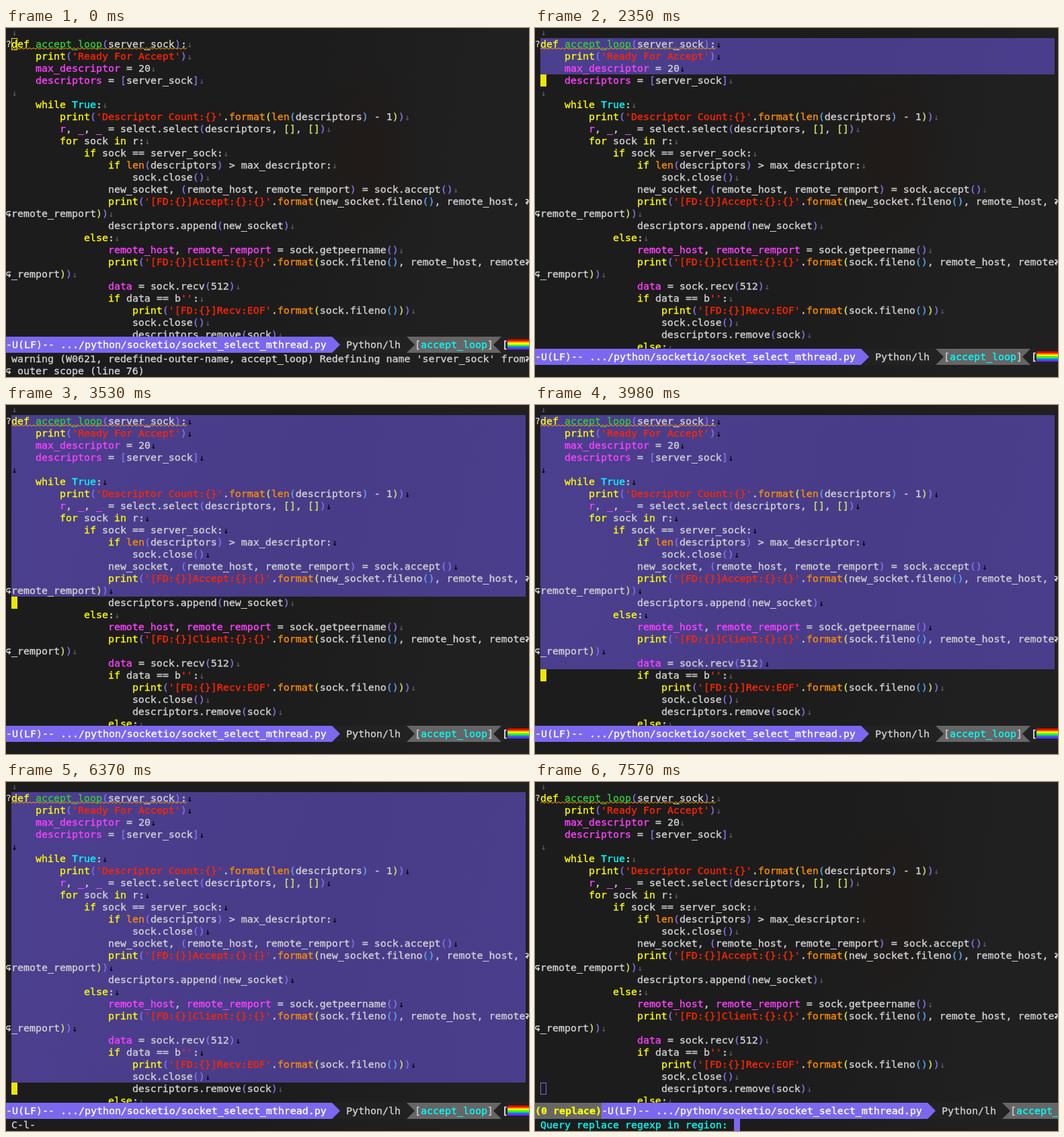
Write an HTML page that moves like this. It is 778 px wide and 519 px high and loops after 8000 ms.

```html
<!DOCTYPE html>
<html lang="en">
<head>
<meta charset="utf-8">
<title>Editor: select region and query replace</title>
<style>
html, body { margin: 0; width: 100%; height: 100%; overflow: hidden; background: #1c1c1c; }
#stage {
  position: relative; width: 778px; height: 519px; overflow: hidden; color: #d2d2d2;
  font: 14.95px/18px "DejaVu Sans Mono", monospace; white-space: pre;
  -webkit-text-stroke: .35px currentColor;
  background:
    radial-gradient(ellipse 90px 150px at 535px 190px, #24171280, transparent),
    linear-gradient(100deg, #1c1c1c 50%, #202020 85%);
}
#stage div, #stage svg { position: absolute; }
#view { left: 0; top: 0; width: 778px; overflow: hidden; }
.row { left: 8px; height: 18px; }
.eol { display: inline-block; width: 9px; font-size: 12px; text-align: center; color: #5a5a5a; }
.sel .eol { color: #050505; }
#region { left: 8px; top: 15px; width: 765px; background: linear-gradient(100deg, #4b3f8f, #483c88 60%, #4a3e8c); }
#cursor { left: 8px; width: 9px; height: 18px; box-sizing: border-box; border: 1px solid #eee600; }
#cursor.solid { background: #eee600; }
#cursor.idle { border-color: #7b68ee; }
.kw { color: #ffff00; } .str { color: #ff2600; } .fn { color: #32cd32; }
.var { color: #ff40ff; } .bi { color: #ff8c00; } .const { color: #00ffff; }
.d1 { color: #8a70ee; } .d2 { color: #cde869; } .d3 { color: #5ba4f0; }
.under-cursor { color: #1c1c1c; }
.mark { width: 8px; height: 18px; fill: none; stroke: #ddd; stroke-width: 1.3; }
#wave { left: 0; top: 0; width: 300px; height: 40px; fill: none; stroke: #ffa500; }
#bar { left: 0; width: 778px; height: 24px; line-height: 24px; background: #222; overflow: hidden; }
#count { left: 0; top: 0; width: 99px; height: 24px; background: #666; color: #ffff00; font-weight: bold; }
#segments { top: 0; width: 820px; height: 24px; }
#segments div { top: 0; height: 24px; }
#file { left: 0; width: 497px; background: #7b68ee; color: #fff;
  clip-path: polygon(0 0, 485px 0, 100% 50%, 485px 100%, 0 100%); }
#where { left: 596px; width: 129px; padding-left: 12px; background: #666;
  clip-path: polygon(0 0, 100% 0, 129px 50%, 100% 100%, 0 100%, 12px 50%); }
#where span { color: #00ffff; }
#segments #rainbow { left: 746px; top: 4px; width: 74px; height: 15px;
  background: linear-gradient(#f00 17%, #f90 0 33%, #ff0 0 50%, #3f0 0 67%, #09f 0 83%, #63f 0); }
.echo { left: 8px; }
#prompt { color: #00ffff; }
#point { left: 296px; top: 501px; width: 9px; height: 18px; background: #7b68ee; }
</style>
</head>
<body>
<div id="stage">
  <div id="view">
    <div id="region"></div>
    <div id="cursor"></div>
    <div class="row" style="left:0;top:15px;font-size:13px">?</div>
    <svg id="wave"><path/></svg>
  </div>
  <div id="bar">
    <div id="count">(0 replace)</div>
    <div id="segments">
      <div id="file">-U(LF)-- .../python/socketio/socket_select_mthread.py</div>
      <div style="left:506px">Python/lh</div>
      <div id="where">[<span>accept_loop</span>]</div>
      <div style="left:738px;color:#fff">[</div>
      <div id="rainbow"></div>
    </div>
  </div>
  <div id="warning" style="left:0;top:483px">
    <div class="echo" style="top:0">warning (W0621, redefined-outer-name, accept_loop) Redefining name 'server_sock' from
 outer scope (line 76)</div>
  </div>
  <div id="message" class="echo" style="top:501px"></div>
  <div id="prompt" class="echo" style="top:501px">Query replace regexp in region: </div>
  <div id="point"></div>
</div>
<script>
const CODE = `
def accept_loop(server_sock):
    print('Ready For Accept')
    max_descriptor = 20
    descriptors = [server_sock]

    while True:
        print('Descriptor Count:{}'.format(len(descriptors) - 1))
        r, _, _ = select.select(descriptors, [], [])
        for sock in r:
            if sock == server_sock:
                if len(descriptors) > max_descriptor:
                    sock.close()
                new_socket, (remote_host, remote_remport) = sock.accept()
                print('[FD:{}]Accept:{}:{}'.format(new_socket.fileno(), remote_host, remote_remport))
                descriptors.append(new_socket)
            else:
                remote_host, remote_remport = sock.getpeername()
                print('[FD:{}]Client:{}:{}'.format(sock.fileno(), remote_host, remote_remport))
                data = sock.recv(512)
                if data == b'':
                    print('[FD:{}]Recv:EOF'.format(sock.fileno()))
                    sock.close()
                    descriptors.remove(sock)
                else:`;
const COLS = 85, ROW = 18, LOOP = 8000;
const $ = id => document.getElementById(id);
const rowTop = row => row * ROW - 3;
const view = $('view');
const rows = [];

const KINDS = [
  [/^'/, 'str'],
  [/^(def|while|for|in|if|else|print)$/, 'kw'],
  [/^(len|format)$/, 'bi'],
  [/^True$/, 'const'],
  [/^accept_loop$/, 'fn'],
];

// Splits a line into [text, class] pieces; brackets are coloured by depth.
function tokenize(line) {
  const target = (line.match(/^[\w, ]+(?= = )/) || [''])[0].length;
  let depth = 0, at = 0;
  return (line.match(/'[^']*'|\w+|\s+|[^\w\s]/g) || []).map(text => {
    let kind = KINDS.find(([re]) => re.test(text))?.[1] || '';
    if (/^[([]$/.test(text)) kind = 'd' + ++depth;
    else if (/^[)\]]$/.test(text)) kind = 'd' + depth--;
    else if (at < target && /\w/.test(text)) kind = 'var';
    at += text.length;
    return [text, kind];
  });
}

function addSpan(row, text, kind) {
  const span = document.createElement('span');
  span.className = kind;
  span.textContent = text;
  row.append(span);
}

function addRow() {
  const row = document.createElement('div');
  row.className = 'row';
  row.style.top = rowTop(rows.length) + 'px';
  view.append(row);
  rows.push(row);
  return row;
}

function addWrapMark(parent, top, left) {
  const path = left ? 'M7 6H3Q1 6 1 8.5T3 11H6M4 8.5L6.5 11L4 13.5'
                    : 'M0 6H2Q4 6 4 8.5T2 11H0M3 8.5L.5 11L3 13.5';
  parent.insertAdjacentHTML('beforeend',
    `<svg class="mark" style="left:${left ? 0 : 773}px;top:${top}px"><path d="${path}"/></svg>`);
}

function addLine(line) {
  let row = addRow(), col = 0;
  for (const [text, kind] of tokenize(line)) {
    const head = text.slice(0, COLS - col), tail = text.slice(COLS - col);
    addSpan(row, head, kind);
    col += head.length;
    if (col === COLS) {
      addWrapMark(view, rowTop(rows.length - 1), false);
      addWrapMark(view, rowTop(rows.length), true);
      row = addRow();
      if (tail) addSpan(row, tail, kind);
      col = tail.length;
    }
  }
  addSpan(row, '↓', 'eol');
}

CODE.split('\n').forEach(addLine);
addWrapMark($('warning'), 0, false);
addWrapMark($('warning'), ROW, true);
document.querySelector('#wave path').setAttribute('d', 'M8 31.5' + 'l3 -2l3 2'.repeat(43) + 'l3 -2');

// The first letter of "def" gets its own span, as the cursor inverts it.
const def = rows[1].firstChild;
def.innerHTML = '<span>d</span>ef';

// Each track is a list of [start ms, value].
const tracks = {
  row: [[0, 1], [1900, 2], [2200, 3], [2350, 4], [2500, 5], [2650, 6], [2790, 8], [2940, 9],
        [3090, 12], [3240, 14], [3390, 15], [3530, 16], [3680, 18], [3830, 20], [3980, 22],
        [4130, 24], [4430, 25]],
  cursor: [[0, 'hollow'], [1000, 'solid'], [1450, ''], [1750, 'solid'], [4880, ''],
           [5480, 'solid'], [5930, ''], [6370, 'solid'], [6520, 'idle']],
  message: [[0, ''], [1750, 'Mark set'], [1900, ''], [5480, 'C-l-'], [6520, '']],
  point: [[0, false], [6520, true], [6970, false], [7570, true]],
};
const valueAt = (track, t) => track.findLast(([start]) => start <= t)[1];
const show = (el, on) => { el.style.visibility = on ? 'visible' : 'hidden'; };

function draw(t) {
  const row = valueAt(tracks.row, t), cursor = valueAt(tracks.cursor, t);
  const warned = t < 1750, asking = t >= 6520;
  const selected = asking ? 1 : row;

  view.style.height = $('bar').style.top = (warned ? 459 : 477) + 'px';
  $('region').style.height = (selected - 1) * ROW + 'px';
  rows.forEach((el, i) => el.classList.toggle('sel', i > 0 && i < selected));

  $('cursor').className = cursor;
  $('cursor').style.top = rowTop(row) + 'px';
  show($('cursor'), cursor);
  def.firstChild.classList.toggle('under-cursor', row === 1 && cursor === 'solid');

  show($('warning'), warned);
  show($('count'), asking);
  $('segments').style.left = asking ? '99px' : 0;
  $('message').textContent = valueAt(tracks.message, t);
  show($('prompt'), asking);
  show($('point'), valueAt(tracks.point, t));
}

const start = performance.now();
function tick() {
  draw((performance.now() - start) % LOOP);
  requestAnimationFrame(tick);
}
tick();
</script>
</body>
</html>
```
